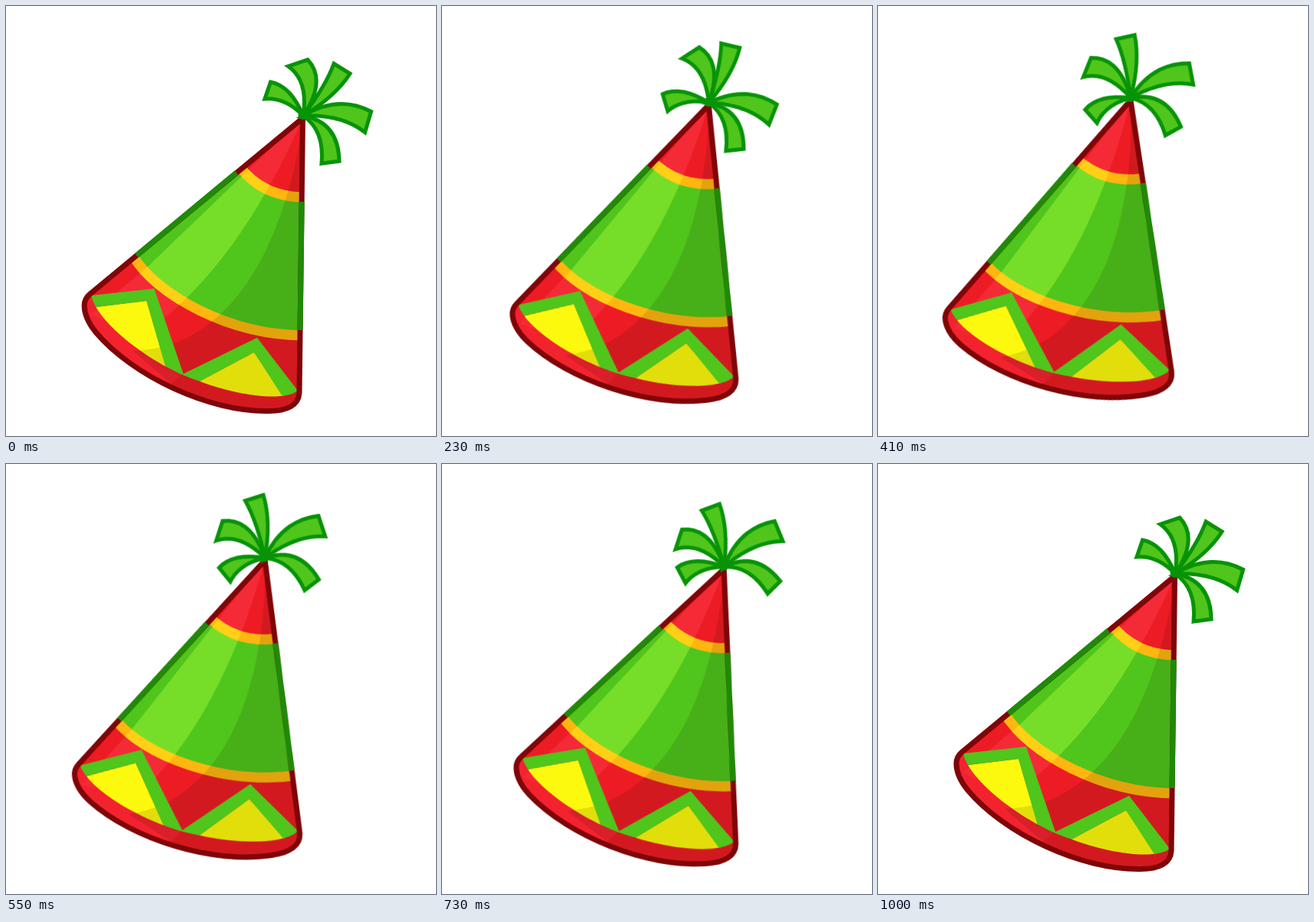
An HTML page without scripts that plays this animation: 560x560 px, repeating every 1050 ms.

```html
<!DOCTYPE html>
<html lang="en">
<head>
<meta charset="utf-8">
<title>Party hat</title>
<style>
  html, body { margin: 0; width: 100%; height: 100%; overflow: hidden; background: #fff; }
  svg { display: block; width: 100%; height: 100%; }

  /* 23 ticks per loop; each stretch moves in whole ticks */
  .sway { animation: sway 1050ms -5ms infinite; }
  @keyframes sway {
    0%      { transform: rotate(0deg); animation-timing-function: steps(2); }
    8.696%  { transform: rotate(calc(var(--a) * .38)); animation-timing-function: steps(3); }
    21.739% { transform: rotate(var(--a)); animation-timing-function: steps(4); }
    39.13%  { transform: rotate(var(--b)); animation-timing-function: steps(1); }
    43.478% { transform: rotate(var(--c)); animation-timing-function: steps(2); }
    52.174% { transform: rotate(var(--d)); animation-timing-function: steps(2); }
    60.87%  { transform: rotate(var(--e)); animation-timing-function: steps(2); }
    69.565% { transform: rotate(var(--f)); animation-timing-function: steps(2); }
    78.261% { transform: rotate(var(--g)); animation-timing-function: steps(2); }
    86.957% { transform: rotate(calc(var(--g) * .25)); animation-timing-function: steps(2); }
    95.652%, 100% { transform: rotate(0deg); }
  }

  .hat { transform-origin: 215px 488px;
    --a: -6.4deg; --b: -9.3deg; --c: -9.3deg; --d: -8deg; --e: -5.6deg; --f: -3.2deg; --g: -1.15deg; }

  .ribbon { transform-origin: 387px 143px; fill: #50c51b; stroke: #079307; stroke-width: 5; }
  .r1 { --a: -29deg; --b: -51.2deg; --c: -51.5deg; --d: -50deg; --e: -48deg; --f: -43.5deg; --g: -17deg; }
  .r2 { --a: -8deg; --b: -40deg; --c: -42deg; --d: -45.5deg; --e: -49deg; --f: -50deg; --g: -20deg; }
  .r3 { --a: -12.2deg; --b: -35deg; --c: -37deg; --d: -41.5deg; --e: -47deg; --f: -49deg; --g: -20.4deg; }
  .r4 { --a: 11.4deg; --b: -17.7deg; --c: -21deg; --d: -26.7deg; --e: -33deg; --f: -35.4deg; --g: -16deg; }
  .r5 { --a: 7.9deg; --b: -12.4deg; --c: -15.5deg; --d: -21.7deg; --e: -29deg; --f: -34deg; --g: -16deg; }
</style>
</head>
<body>
<svg viewBox="0 0 560 560">
  <defs>
    <path id="cone" d="M386.500 146L382 504C381 520 366 527.5 342 527.5C265 529 165 482 117 425C108 414 102 401 102 390C102 383 104.500 379 109.500 375Z"/>
    <path id="green" d="M304 209Q335 250 392 249V429C290 430 195 375 165 325Z"/>
    <path id="lit" d="M387 145L184 340L110 402L175 430Q300 345 387 145Z"/>
    <path id="shade" d="M387 145C375 240 340 350 275 405C240 435 210 447 165 449L215 492L250 540H400V145Z"/>
    <g id="bands" fill="none" stroke-width="13">
      <path d="M304 209Q335 250 392 249"/>
      <path d="M165 325C195 375 290 430 392 429"/>
    </g>
    <clipPath id="inCone"><use href="#cone"/></clipPath>
    <clipPath id="inGreen"><use href="#green"/></clipPath>
    <clipPath id="inLit"><use href="#lit"/></clipPath>
    <clipPath id="inRim">
      <path d="M111 377C118 412 190 468 250 488C300 507 360 516 380 501V350H111Z"/>
    </clipPath>
  </defs>

  <g class="hat sway">
    <g clip-path="url(#inCone)">
      <use href="#cone" fill="#ed1c24"/>
      <path d="M90 375L111 377L231 479L215 492L90 430Z" fill="#f2232f"/>
      <use href="#lit" fill="#f52a37"/>
      <use href="#green" fill="#50c51b"/>
      <use href="#lit" fill="#76de28" clip-path="url(#inGreen)"/>
      <use href="#bands" stroke="#ffb70f"/>
      <use href="#bands" stroke="#ffd015" clip-path="url(#inLit)"/>
      <path d="M118 392L183 384L210 476H118ZM246 492L323 451L368 516H246Z" fill="#fdf90e" clip-path="url(#inRim)"/>
      <use href="#shade" opacity=".11"/>
      <path d="M111 377L193 368L231 479L327 432L380 501V530H111ZM118 392V530H225L183 384ZM252 489V530H374L323 451Z"
        fill="#50c51b" fill-rule="evenodd" clip-path="url(#inRim)"/>
    </g>
    <use href="#cone" fill="none" stroke="#7f0507" stroke-width="7" stroke-linejoin="round"/>
    <path d="M300 217L170 325M385.2 255L383.1 422" stroke="#1f8a08" stroke-width="7"/>

    <path class="ribbon sway r5" d="M387 143Q433 151 434 202L411 205Q415 162 387 143Z"/>
    <path class="ribbon sway r4" d="M387 143Q433 115 475.500 137.500L467.500 164.500Q437 141 387 143Z"/>
    <path class="ribbon sway r3" d="M387 143Q417 103 427 75L448 88Q429 118 387 143Z"/>
    <path class="ribbon sway r2" d="M387 143Q394 97 367.500 78.500L393 70Q418 97 387 143Z"/>
    <path class="ribbon sway r1" d="M387 143Q364 119 337 121L344.500 99Q371 104 387 143Z"/>
    <circle cx="386.500" cy="142" r="6" fill="#079307"/>
  </g>
</svg>
</body>
</html>
```
